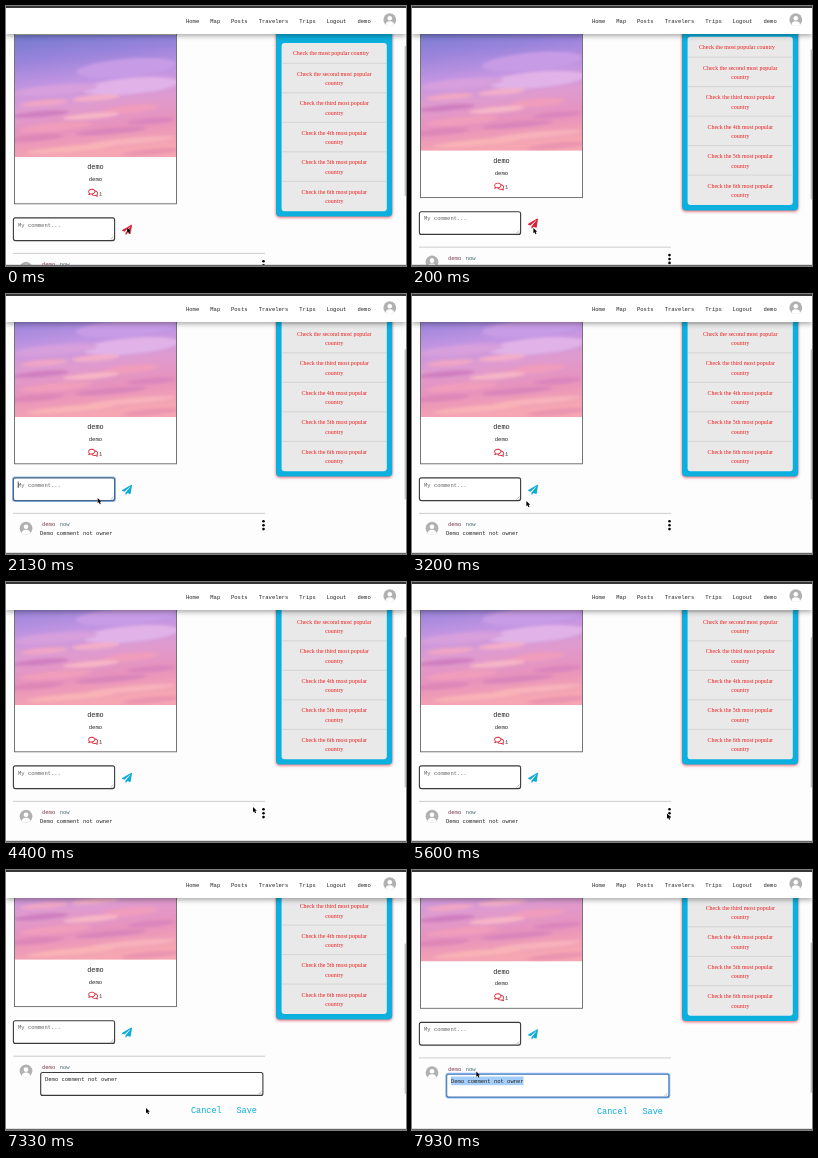
An HTML page that plays this animation: 400x260 px, repeating every 8000 ms.

```html
<!DOCTYPE html>
<html lang="en">
<head>
<meta charset="utf-8">
<title>Comment editing</title>
<style>
  html, body { margin: 0; width: 100%; height: 100%; overflow: hidden; background: #fdfdfd; }
  svg { display: block; width: 100%; height: 100%; }
  text { font: 5.5px "Liberation Mono", monospace; fill: #222; }
  .middle { text-anchor: middle; }
  .title { font-size: 6.9px; }
  .action { font-size: 8.5px; fill: #0cabd9; }
  .row { font: 5.95px "Liberation Serif", serif; fill: #f01c1c; text-anchor: middle; }
  .field { fill: #fff; stroke: #3a3a3a; stroke-width: 1.1; }
  .panel { filter: drop-shadow(0 1px 1.6px #e0606a); }
  .bar { filter: drop-shadow(0 2px 2.5px #0005); }
</style>
</head>
<body>
<svg viewBox="0 0 400 260">
  <defs>
    <linearGradient id="sky" x1="0.15" y1="0" x2="0.3" y2="1">
      <stop offset="0" stop-color="#767bd0"/>
      <stop offset=".2" stop-color="#9a84db"/>
      <stop offset=".42" stop-color="#c596e2"/>
      <stop offset=".6" stop-color="#df9bcf"/>
      <stop offset=".8" stop-color="#e792bd"/>
      <stop offset="1" stop-color="#f5a6b2"/>
    </linearGradient>
    <filter id="soft" x="-30%" y="-30%" width="160%" height="160%"><feGaussianBlur stdDeviation="1.8"/></filter>
    <clipPath id="photo"><path d="M9 29H170V151H9z"/></clipPath>
    <clipPath id="disc"><circle r="6.4"/></clipPath>
    <g id="avatar">
      <circle r="6.4" fill="#b1b1b1"/>
      <g clip-path="url(#disc)" fill="#fff"><circle cy="-1.4" r="2.3"/><ellipse cy="5" rx="4.2" ry="3.5"/></g>
    </g>
  </defs>

  <rect width="400" height="260" fill="#fdfdfd"/>
  <g id="page">
    <rect x="8.5" y="28" width="162" height="169.8" fill="#fff" stroke="#666" stroke-width=".9"/>
    <g clip-path="url(#photo)">
      <rect x="9" y="29" width="161" height="122" fill="url(#sky)"/>
      <g id="clouds" filter="url(#soft)"></g>
    </g>
    <text class="middle title" x="89.4" y="163.3">demo</text>
    <text class="middle" x="89.4" y="174.9">demo</text>
    <path transform="translate(82.2 182.300) scale(.0172)" fill="#d92a3a" d="M532 386.200c27.500-27.100 44-61.100 44-98.200 0-80-76.500-146.100-176.200-157.900C368.300 72.500 294.300 32 208 32 93.100 32 0 103.600 0 192c0 37 16.500 71 44 98.200-15.300 30.700-37.300 54.500-37.700 54.900-6.300 6.700-8.100 16.500-4.400 25 3.600 8.500 12 14 21.200 14 53.500 0 96.700-20.200 125.200-38.800 9.200 2.100 18.700 3.700 28.400 4.900C208.100 407.600 281.800 448 368 448c20.800 0 40.800-2.400 59.800-6.800C456.300 459.700 499.400 480 553 480c9.200 0 17.500-5.500 21.200-14 3.600-8.500 1.900-18.300-4.400-25-.4-.3-22.500-24.100-37.800-54.800zm-392.800-92.300L122.100 305c-14.100 9.100-28.500 16.300-43.100 21.400 2.700-4.700 5.400-9.700 8-14.800l15.500-31.100L77.700 256C64.200 242.600 48 220.700 48 192c0-60.700 73.300-112 160-112s160 51.300 160 112-73.300 112-160 112c-16.500 0-33-1.900-49-5.600l-19.800-4.500zM498.300 352l-24.700 24.400 15.500 31.100c2.600 5.100 5.300 10.100 8 14.800-14.600-5.100-29-12.300-43.100-21.400l-17.100-11.100-19.900 4.600c-16 3.700-32.500 5.600-49 5.600-54 0-102.200-20.100-131.300-49.700C338 339.500 416 272.900 416 192c0-3.400-.4-6.700-.7-10C479.700 196.500 528 238.800 528 288c0 28.700-16.200 50.600-29.700 64z"/>
    <text x="92.900" y="189.700" style="fill:#633">1</text>

    <rect id="ring" x="6" y="210.500" width="104" height="25.500" rx="3" fill="#8dbdf2"/>
    <rect id="newField" class="field" x="7.400" y="211.900" width="101.200" height="22.700" rx="2"/>
    <path d="M104.500 233.500l3-3m-1.200 3l1.200-1.200" stroke="#888" stroke-width=".5"/>
    <text x="12" y="220.700" style="fill:#666">My comment...</text>
    <path id="caret" d="M12.200 215.500v6.500" stroke="#222" stroke-width=".7"/>
    <path id="plane" transform="translate(116 218.700) scale(.0196)" d="M476 3.200L12.500 270.600c-18.100 10.400-15.800 35.600 2.200 43.200L121 358.400l287.300-253.200c5.500-4.900 13.300 2.600 8.600 8.300L176 407v80.500c0 23.600 28.500 32.900 42.500 15.800L282 426l124.600 52.200c14.200 6 30.400-2.900 33-18.200l72-432C515 7.800 493.300-6.800 476 3.200z"/>

    <path d="M7 247.400H259" stroke="#c8c8c8" stroke-width=".9"/>
    <use href="#avatar" x="20" y="262.200"/>
    <text x="36" y="260.300" style="fill:#7c3a4c">demo</text>
    <text x="53.700" y="260.300" style="fill:#4a6c72">now</text>
    <g id="reading">
      <text x="34" y="269.300">Demo comment not owner</text>
      <circle cx="257.500" cy="255.300" r="1.300"/><circle cx="257.500" cy="259.200" r="1.300"/><circle cx="257.500" cy="263.100" r="1.300"/>
    </g>
    <g id="editing">
      <rect id="editRing" x="33.300" y="262.300" width="225" height="25.700" rx="3" fill="#8dbdf2"/>
      <rect id="editField" class="field" x="34.700" y="263.700" width="222.200" height="22.900" rx="2"/>
      <path d="M252.500 285.300l3-3m-1.200 3l1.200-1.200" stroke="#888" stroke-width=".5"/>
      <rect id="selection" y="266" height="8.700" fill="#a5cdfa"/>
      <text x="39" y="272.400">Demo comment not owner</text>
      <text class="action" x="185" y="303.900">Cancel</text>
      <text class="action" x="230.500" y="303.900">Save</text>
    </g>

    <rect class="panel" x="270" y="10" width="116.200" height="200.600" rx="4" fill="#0cb0de"/>
    <rect x="275.600" y="37" width="105.200" height="168.300" rx="3" fill="#e9e9e9"/>
    <g id="rows"></g>
  </g>

  <rect class="bar" width="400" height="28" fill="#fff"/>
  <rect width="400" height="2" fill="#37373a"/>
  <g id="nav"></g>
  <use href="#avatar" x="383.800" y="13.700"/>
  <rect id="thumb" x="398.600" width="1.400" height="150" fill="#c2c2c2"/>
  <rect y="258.800" width="400" height="1.200" fill="#66666a"/>
  <path id="cursor" d="M0 0V5.200L1.200 4.200 2.100 6.200 3.100 5.800 2.200 3.800H3.800z" fill="#000" stroke="#fff" stroke-width=".45" paint-order="stroke"/>
</svg>
<script>
const LOOP = 8000;
const $ = id => document.getElementById(id);

function add(parent, tag, attrs, content = "") {
  const node = document.createElementNS("http://www.w3.org/2000/svg", tag);
  for (const name in attrs) node.setAttribute(name, attrs[name]);
  node.textContent = content;
  $(parent).append(node);
}

const links = { Home: 180, Map: 204.3, Posts: 225, Travelers: 252.7, Trips: 293.3, Logout: 320.5, demo: 351.5 };
for (const label in links) add("nav", "text", { x: links[label], y: 17.3 }, label);

const ranks = ["most", "second most", "third most", "4th most", "5th most", "6th most"];
ranks.forEach((rank, i) => {
  const line = `Check the ${rank} popular`;
  if (!i) return add("rows", "text", { class: "row", x: 325, y: 49.2 }, line + " country");
  const y = 57.3 + (i - 1) * 29.5;
  add("rows", "path", { d: `M276 ${y}H380.6`, stroke: "#cfcfcf", "stroke-width": .8 });
  add("rows", "text", { class: "row", x: 328.3, y: y + 12.6 }, line);
  add("rows", "text", { class: "row", x: 328.3, y: y + 22 }, "country");
});

// x, y, horizontal radius, vertical radius, colour
const clouds = [
  [120, 62, 50, 9, "#c79be6"], [125, 80, 48, 8, "#e0b2e8"], [50, 84, 42, 5, "#d79fdc"],
  [90, 92, 24, 3, "#f3aec8"], [38, 97, 24, 3, "#f0a6c4"], [125, 103, 28, 4, "#f09cbc"],
  [35, 108, 28, 3, "#cf7fc0"], [85, 110, 28, 3, "#f6b6c6"], [145, 115, 24, 3, "#da86be"],
  [50, 121, 36, 4, "#f09dbb"], [105, 125, 36, 3, "#d985bb"], [30, 132, 28, 3, "#dd86b8"],
  [125, 135, 44, 3, "#f8b2bc"], [65, 143, 44, 3, "#f9b3b6"], [145, 146, 30, 3, "#ea94b0"]
];
for (const [cx, cy, rx, ry, fill] of clouds)
  add("clouds", "ellipse", { cx, cy, rx, ry, fill, transform: `rotate(-5 ${cx} ${cy})` });

const scrollKeys = [[70, 0], [500, 28], [6700, 28], [7230, 61.2], [7500, 61.2], [7930, 59.5]];
const cursorKeys = [
  [0, 121.2, 221.5], [600, 122, 223.5], [900, 122, 223.5], [1650, 91.7, 204], [2900, 91.7, 204],
  [4150, 247, 225], [4500, 247, 225], [5100, 256, 230], [5500, 256, 230], [5900, 250, 239],
  [6150, 250, 239], [6580, 169, 228.3], [6750, 169, 228.3], [7150, 140, 238], [7340, 140, 238],
  [7600, 112, 209], [7660, 112, 209], [7920, 64.3, 201.5]
];

function sample(keys, time) {
  const next = keys.findIndex(key => key[0] > time);
  if (next < 0) return keys.at(-1).slice(1);
  if (next === 0) return keys[0].slice(1);
  const a = keys[next - 1], b = keys[next];
  const p = (time - a[0]) / (b[0] - a[0]);
  const eased = p * p * (3 - 2 * p);
  return a.slice(1).map((value, i) => value + (b[i + 1] - value) * eased);
}

const show = (id, visible) => $(id).setAttribute("visibility", visible ? "inherit" : "hidden");

function draw(time) {
  const [scroll] = sample(scrollKeys, time);
  const [x, y] = sample(cursorKeys, time);
  const focused = time >= 1730 && time < 3050;
  const editing = time >= 6150;
  const selecting = time >= 7640;

  $("page").setAttribute("transform", `translate(0 ${-scroll})`);
  $("thumb").setAttribute("y", 40 + scroll * .55);
  $("cursor").setAttribute("transform", `translate(${x} ${y})`);
  $("plane").setAttribute("fill", time < 930 ? "#dc1f35" : "#0cabd9");
  show("ring", focused);
  show("caret", focused);
  $("newField").style.stroke = focused ? "#47627f" : "";

  show("reading", !editing);
  show("editing", editing);
  show("editRing", selecting);
  $("editField").style.stroke = selecting ? "#4a78b5" : "";
  const left = y < 204 ? 39 : Math.min(x, 111.5);
  show("selection", selecting);
  $("selection").setAttribute("x", left);
  $("selection").setAttribute("width", 111.5 - left);
}

function tick() {
  draw(performance.now() % LOOP);
  requestAnimationFrame(tick);
}
tick();
</script>
</body>
</html>
```
